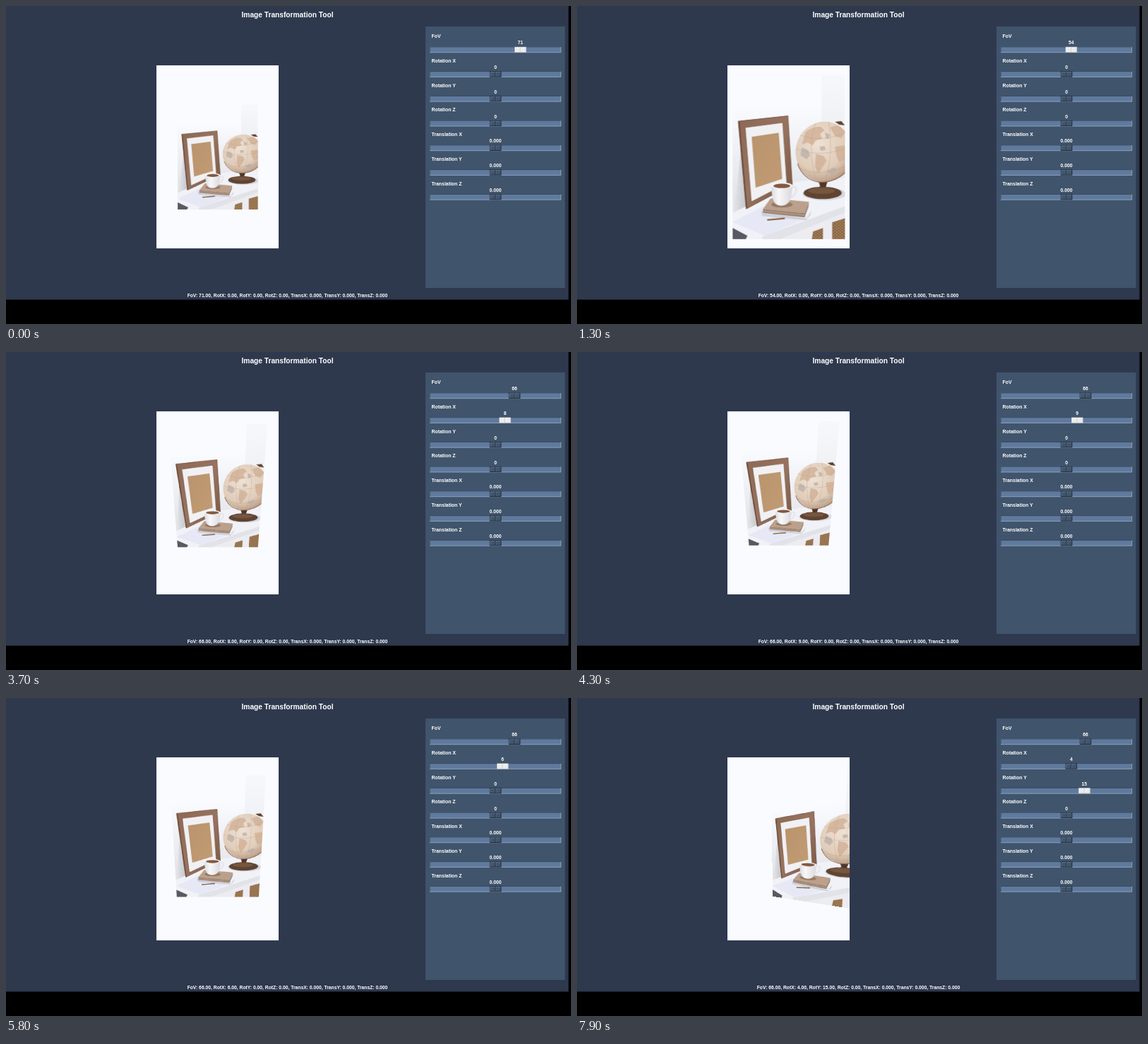
Recreate the animation shown at these times as an HTML page. Size 800 px wide and 450 px high, loop 8 s.

```html
<!DOCTYPE html>
<html lang="en">
<head>
<meta charset="utf-8">
<title>Image Transformation Tool</title>
<style>
  html, body { margin: 0; width: 800px; height: 450px; overflow: hidden; background: #000; }
  svg { position: absolute; left: 0; top: 0; }
  text { font: bold 6.75px "Liberation Sans", Arial, sans-serif; fill: #fff; }
  .mid { text-anchor: middle; }
  .title { font-size: 10.2px; }
  .label { font-size: 6.9px; }
  #view { position: absolute; left: 212.5px; top: 84px; width: 173.5px; height: 259px; overflow: hidden; background: #fafbff; }
  #photo { transform-origin: 0 0; }
</style>
</head>
<body>
<svg width="800" height="450">
  <rect width="796.5" height="415.5" fill="#2e394e"/>
  <rect x="594" y="29" width="197.5" height="370" fill="#40546c"/>
  <text class="mid title" x="398.5" y="15.8">Image Transformation Tool</text>
  <g id="sliders"></g>
  <text class="mid" id="status" x="398.5" y="412.2"></text>
</svg>

<div id="view">
  <svg id="photo" width="158.8" height="232.2" viewBox="220.1 97.9 158.8 232.2">
    <defs>
      <linearGradient id="wall" x2="0" y2="1">
        <stop offset=".2" stop-color="#fafbff"/><stop offset=".75" stop-color="#e4e5e9"/>
      </linearGradient>
      <linearGradient id="side" x2="0" y2="1">
        <stop offset="0" stop-color="#f7f8fb"/><stop offset="1" stop-color="#e9eaed"/>
      </linearGradient>
      <linearGradient id="shadow">
        <stop offset="0" stop-color="#c4c5ca" stop-opacity="0"/><stop offset="1" stop-color="#c4c5ca"/>
      </linearGradient>
      <linearGradient id="wood" x2="1" y2="1">
        <stop offset="0" stop-color="#8d6853"/><stop offset=".5" stop-color="#987360"/><stop offset="1" stop-color="#77543f"/>
      </linearGradient>
      <linearGradient id="kraft" x2="1" y2="1">
        <stop offset="0" stop-color="#b9946c"/><stop offset="1" stop-color="#c09b75"/>
      </linearGradient>
      <radialGradient id="ball" cx=".4" cy=".35" r=".7">
        <stop offset="0" stop-color="#eee1d4"/><stop offset=".65" stop-color="#e0ccb9"/><stop offset="1" stop-color="#b5967e"/>
      </radialGradient>
      <linearGradient id="mug">
        <stop offset="0" stop-color="#dcdde1"/><stop offset=".35" stop-color="#f8f8fa"/><stop offset="1" stop-color="#dadade"/>
      </linearGradient>
      <clipPath id="disc"><ellipse cx="350" cy="206.500" rx="41" ry="43"/></clipPath>
      <pattern id="wicker" width="5" height="4" patternUnits="userSpaceOnUse">
        <path fill="#b08a62" d="M0 0h5v4h-5z"/><path stroke="#7d5a3b" d="M0 0l5 4M5 0l-5 4"/>
      </pattern>
    </defs>

    <path fill="url(#wall)" d="M220 97h160v234h-160z"/>
    <path fill="url(#side)" d="M346 97h34v150h-34z"/>
    <path fill="url(#shadow)" d="M232 200L240 288 222 293z"/>

    <!-- desk and shelf -->
    <path fill="#f1f2f7" d="M220 293L305 250 322 247 380 243V331H220z"/>
    <path fill="#e2e3e8" d="M380 283L262 326V331H285L380 292z"/>
    <path fill="#ececf1" d="M380 292L285 331H380z"/>
    <path fill="url(#wicker)" d="M361 306L380 300V331H361zM334 319L348 314V331H332z"/>
    <path fill="#e6e9f5" d="M220 306L262 284 329 298 266 325z"/>
    <path fill="#585a63" d="M220 314L241 325 238 331H220z"/>

    <!-- frame -->
    <path fill="url(#wood)" stroke="#6f4f3d" stroke-width=".8" d="M228 163L298.300 155.500 304.500 252.500 239.300 287z"/>
    <path fill="none" stroke="#684836" stroke-width="1.600" d="M229 164L240 286.500"/>
    <path fill="#f1f1f4" stroke="#765540" stroke-width=".7" d="M237.800 172L291 165 296.800 251 246.500 277z"/>
    <path fill="url(#kraft)" d="M247 185L285.300 179.500 290.300 244.500 252.600 257z"/>

    <!-- globe -->
    <ellipse cx="350" cy="266" rx="31" ry="9" fill="#d7d8de"/>
    <path fill="#4f3628" d="M341 246H355L352 256Q359 260 373 262H322Q339 260 344 255z"/>
    <ellipse cx="347.500" cy="264.500" rx="27" ry="8.700" fill="#5f4333"/>
    <ellipse cx="346" cy="261.500" rx="19" ry="4.300" fill="#77563f"/>
    <g clip-path="url(#disc)">
      <ellipse cx="350" cy="206.500" rx="41" ry="43" fill="url(#ball)"/>
      <path fill="#cfae93" opacity=".75" d="M323 179Q333 170 345 171L350 176 344 181 347 188 338 190 333 197 326 193 318 196zM358 172L371 168 379 178 374 187 365 184zM338 209L349 212 353 219 346 230 341 238 337 227zM365 199L380 197V217L371 221 367 212z"/>
      <path fill="#b9afa8" opacity=".75" d="M318 200L327 204 330 211 325 217 316 211zM351 179L358 182 356 188 352 187zM353 234L363 228 369 232 361 239zM343 199L350 198 352 203 345 205z"/>
      <path fill="none" stroke="#b9957b" stroke-width=".5" opacity=".7" d="M308 201Q345 217 390 198M314 182Q345 195 384 178M316 230Q345 243 384 225M338 164Q324 205 340 250M356 163Q364 205 351 250"/>
    </g>
    <path fill="none" stroke="#87644b" stroke-width="1.200" d="M312 223Q320 246 344 249.500 366 249 380 235"/>
    <path fill="#63432f" d="M365 164L374 163 379 169 371 168z"/>

    <!-- book, pencil, cup -->
    <path fill="#cdcfd9" d="M260 290L325 301 331 290 330 296 324 303 262 297z"/>
    <path fill="#bba08b" d="M263 287L274 272 328 277 322 293z"/>
    <path fill="#9d826f" d="M263 287L322 293 328 277 327.500 284 322 299 263 292.500z"/>
    <path stroke="#d2bfae" stroke-width=".6" d="M264 290L322 296"/>
    <path stroke="#8d6547" stroke-width="2.200" d="M269 302.800L294 300.500"/>
    <ellipse cx="290" cy="281" rx="15" ry="4" fill="#967a66"/>
    <path fill="none" stroke="#e6e6ea" stroke-width="2.600" d="M302 257Q311 253 310 261T301 272"/>
    <path fill="url(#mug)" d="M275 254Q275 274 281 280 289 285 297 280 304.500 274 304.500 254z"/>
    <ellipse cx="289.700" cy="254" rx="14.700" ry="4.500" fill="#f8f8fb"/>
    <ellipse cx="289.700" cy="254.500" rx="12" ry="3.200" fill="#85593f"/>
  </svg>
</div>

<script>
const LOOP = 8000, STEP = 100, RAD = Math.PI / 180;
const $ = id => document.getElementById(id);

// [time, value] pairs, joined by straight lines
const fovKeys = [[0, 71], [100, 69], [500, 55], [800, 47], [1000, 49], [1300, 54], [1800, 59],
                 [2100, 63], [2400, 64], [2700, 63], [3000, 67], [3200, 66]];
const rxKeys = [[3500, 0], [3700, 8], [4000, 19], [4200, 14], [4500, -1], [4900, -18], [5100, -22],
                [5400, -3], [5800, 6], [6000, 7], [6200, 4]];
const ryKeys = [[7200, 0], [7600, 19], [7700, 19], [7900, 15]];

function valueAt(keys, t) {
  const i = keys.findIndex(k => k[0] > t);
  if (i === 0) return keys[0][1];
  if (i < 0) return keys.at(-1)[1];
  const [t0, a] = keys[i - 1], [t1, b] = keys[i];
  return Math.round(a + (b - a) * (t - t0) / (t1 - t0));
}

const names = ['FoV', 'Rotation X', 'Rotation Y', 'Rotation Z', 'Translation X', 'Translation Y', 'Translation Z'];
$('sliders').innerHTML = names.map((name, i) => `
  <g transform="translate(0 ${i * 34.75})">
    <text class="label" x="602.5" y="45.2">${name}</text>
    <path fill="#607a9e" d="M599.5 57.5h186.5v8.5h-186.5z"/>
    <path fill="none" stroke="#2f3f53" stroke-width=".8" d="M600 66V57.9H786"/>
    <path fill="none" stroke="#93a8c3" stroke-width=".8" d="M600 65.7H785.7V58"/>
    <g class="knob">
      <text class="mid" y="54.4"></text>
      <rect x="-7.7" y="58.2" width="15.6" height="7.2" stroke-width=".9"/>
      <path class="lit" fill="none" stroke-width=".7" d="M-7 64.6V58.9H7.2M.7 59V64.6"/>
      <path class="shade" fill="none" stroke-width=".8" d="M-.1 58.6V65"/>
    </g>
  </g>`).join('');

const knobs = [...document.querySelectorAll('.knob')].map(g => ({
  g, label: g.querySelector('text'), face: g.querySelector('rect'),
  lit: g.querySelector('.lit'), shade: g.querySelector('.shade')
}));

function setKnob(i, value, active) {
  const k = knobs[i];
  const x = i ? 693 + value * 1.69 : 609.3 + value * 1.676;
  const edge = active ? '#c4c6c9' : '#1c2734';
  k.g.setAttribute('transform', `translate(${x})`);
  k.label.textContent = i > 3 ? value.toFixed(3) : value;
  k.face.setAttribute('fill', active ? '#ececec' : '#40546c');
  k.face.setAttribute('stroke', edge);
  k.lit.setAttribute('stroke', active ? '#fff' : '#71849b');
  k.shade.setAttribute('stroke', edge);
}

// The photo is a plane at depth 1, seen by a turning pinhole camera.
function setPhoto(fov, rx, ry) {
  const A = .4676, B = .7645;
  const fx = 86.5 / Math.tan(fov / 2 * RAD), fy = 129.75 / Math.tan(fov * .75 * RAD);
  const cx = Math.cos(rx * RAD), sx = Math.sin(rx * RAD);
  const cy = Math.cos(ry * RAD), sy = Math.sin(ry * RAD);
  const column = (x, y, z) => {
    const z1 = z * cy - x * sy, depth = z1 * cx + y * sx;
    return [fx * (x * cy + z * sy) + 86.8 * depth, fy * (y * cx - z1 * sx) + 130 * depth, 0, depth];
  };
  const m = [column(2 * A / 158.8, 0, 0), column(0, 2 * B / 232.2, 0), [0, 0, 1, 0], column(-A, -B, 1)];
  $('photo').style.transform = `matrix3d(${m.flat().map(n => n.toFixed(7))})`;
}

function draw(t) {
  const values = [valueAt(fovKeys, t), valueAt(rxKeys, t), valueAt(ryKeys, t), 0, 0, 0, 0];
  const active = t < 3300 ? 0 : t < 3400 ? -1 : t < 6600 ? 1 : t < 7000 ? -1 : 2;
  values.forEach((v, i) => setKnob(i, v, i === active));
  setPhoto(...values);
  const keys = ['FoV', 'RotX', 'RotY', 'RotZ', 'TransX', 'TransY', 'TransZ'];
  $('status').textContent = keys.map((k, i) => `${k}: ${values[i].toFixed(i > 3 ? 3 : 2)}`).join(', ');
}

const start = performance.now();
function tick() {
  const t = (performance.now() - start) % LOOP;
  draw(Math.floor(t / STEP) * STEP);
  requestAnimationFrame(tick);
}
tick();
</script>
</body>
</html>
```
